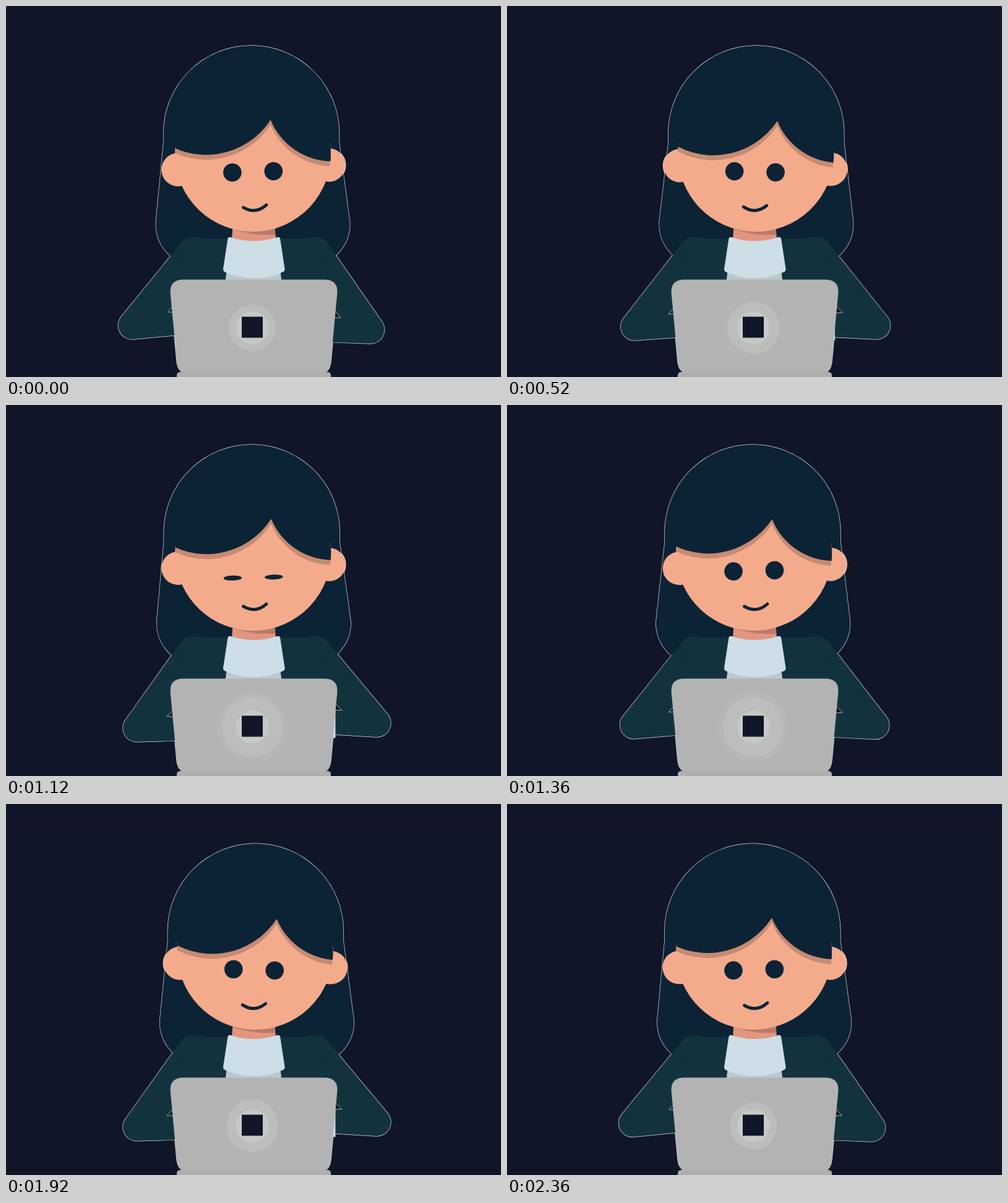
Animation of 800 by 600 pixels, one loop 2400 ms. Source, as an HTML page:

```html
<!DOCTYPE html>
<html lang="en">
<head>
<meta charset="utf-8">
<title>Working at a laptop</title>
<style>
  html, body { margin: 0; width: 100%; height: 100%; overflow: hidden; background: #101628; }
  svg { display: block; width: 100vw; height: 100vh; }
  .edge { fill: none; stroke: #fff; stroke-width: 1.4; stroke-opacity: .85; }
  .hair { fill: #0c2336; }
  .skin { fill: #f4ab8c; }
  .coat { fill: #12333d; }
  .shirt { fill: #cddee7; }
  .hole { fill: #101628; stroke: #fff; stroke-width: .8; stroke-opacity: .8; }
  .line { fill: none; stroke: #0c2336; }
</style>
</head>
<body>
<svg viewBox="0 0 800 600">
  <defs>
    <clipPath id="face"><circle cx="400.8" cy="239" r="126"/></clipPath>
  </defs>

  <!-- thin light rim, hidden wherever shapes overlap -->
  <g class="edge">
    <path class="armL"/>
    <path class="armR"/>
    <path class="lid"/>
    <g class="head">
      <g class="ears"><circle cx="279.3" cy="261" r="27"/><circle cx="523" cy="261" r="27"/></g>
    </g>
    <path class="mane"/>
  </g>

  <path class="hair mane"/>

  <path fill="#e2957f" d="M367 350H434L437 390H364Z"/>
  <path fill="#b97a69" d="M367 350H434L435 371Q396 371 367 361Z"/>

  <g class="head">
    <g class="skin ears"><circle cx="279.3" cy="261" r="27"/><circle cx="523" cy="261" r="27"/></g>
    <circle class="skin" cx="400.8" cy="239" r="126"/>
    <g clip-path="url(#face)">
      <path class="fringe" data-drop="8" fill="#c68b72"/>
      <path class="fringe hair" data-drop="0"/>
    </g>
    <!-- closes the seam between fringe and hair -->
    <path class="line" stroke-width="2.500" d="M275.600 224A126 126 0 0 1 526 224"/>
    <ellipse class="eye hair" cx="366.800" rx="14.800"/>
    <ellipse class="eye hair" cx="433.300" rx="14.800"/>
    <path class="line" stroke-width="5" stroke-linecap="round" d="M383 325.300Q402.500 337.500 420.300 322.300"/>
  </g>

  <path id="cuff" class="shirt"/>
  <path class="coat armL"/>
  <path class="coat armR"/>
  <path class="coat" d="M281 386Q288 374 302 374Q312 374 320 376.500H480Q490 374 500 374Q513 374 520 384L510 480H290Z"/>
  <path id="holeL" class="hole"/>
  <path id="holeR" class="hole"/>

  <path fill="#bac9ce" d="M357 425H443L446 450H354Z"/>
  <path fill="#e2957f" d="M367 370H434L436 382H365Z"/>
  <path class="shirt" d="M363 374Q400 386 438 374Q442.500 373 443.200 377L450.500 425Q451 429 447 430.500Q401 450 354.500 430.500Q350.500 429 351 425L358.300 377Q359 373 363 374Z"/>

  <rect x="276" y="592" width="249" height="14" rx="5" fill="#aeaeae"/>
  <path class="lid" fill="#b3b3b3"/>
  <circle id="halo" cx="398" cy="520.500" r="57" fill="#c4c8c4"/>
  <circle id="ring" cx="398" cy="520.500" fill="#bcbdbc"/>
  <circle cx="398" cy="520.500" r="26.500" fill="#c6cac7"/>
  <rect x="381" y="502.500" width="34" height="34" fill="#101628"/>
</svg>

<script>
const LOOP = 2400, STEP = 40;
const all = s => document.querySelectorAll(s);
const set = (s, name, value) => all(s).forEach(el => el.setAttribute(name, value));
const shape = (s, d) => set(s, 'd', d);
const mix = (a, b, k) => a + (b - a) * k;
// cosine wave from -1 to 1 that peaks at the given time
const wave = (t, period, peak) => Math.cos(2 * Math.PI * (t - peak) / period);
const unit = w => (1 + w) / 2;

function drawHair(sway, trail) {
  const x = 400 + 3.6 * sway, b = 401.6 + 3.9 * trail;
  shape('.mane', `M${x - 142} 222V206A142 142 0 0 1 ${x + 142} 206V222
    L${b + 156.8} 350C${b + 157.5} 372 ${b + 149} 392 ${b + 129} 408H${b - 129}
    C${b - 149} 392 ${b - 157.5} 372 ${b - 156.8} 350Z`);
}

function drawHead(t, sway) {
  set('.head', 'transform', `rotate(${1.78 * sway} 400 300)`);
  set('.ears', 'transform', `translate(${-0.8 * Math.sin(2 * Math.PI * t / LOOP)} 0)`);
  const tilt = 0.3 + 0.6 * wave(t, 1200, 350);
  all('.fringe').forEach(el => {
    // cancels the head's turn: the fringe slides and tilts by itself
    const x = 0.2 + 5.2 * sway, y = 0.8 * sway + +el.dataset.drop;
    el.setAttribute('transform',
      `rotate(${-1.78 * sway} 400 300) translate(${x} ${y}) rotate(${tilt} 405 200)`);
  });
  const away = Math.min(1, Math.abs(t - 1120) / 120);
  const ry = mix(4, 14.8, away * away * (3 - 2 * away));
  set('.eye', 'ry', ry);
  set('.eye', 'cy', 283 - ry);
}

function drawArms(l, r) {
  const R = 22.5;
  let x = mix(202.5, 211.5, l), y = mix(515.5, 522.3, l);
  shape('.armL', `M302 374Q288 374 281 386L${x - R * .79} ${y - R * .61}
    A${R} ${R} 0 0 0 ${x + 2} ${y + R}L300 ${mix(528, 542.5, l)}V386Z`);
  const hy = mix(493.5, 504, l), hx = mix(262, 260, l);
  shape('#holeL', `M${hx} ${hy}H276L274 ${hy - 14}Z`);

  x = mix(589, 600, r); y = mix(523.5, 514, r);
  shape('.armR', `M500 374Q513 374 520 384L${x + R * .8} ${y - R * .6}
    A${R} ${R} 0 0 1 ${x - 1} ${y + R}L${mix(522, 533, r)} ${mix(543.5, 532.5, r)}
    V${mix(500, 490, r)}L510 470V386Z`);
  const gx = mix(541, 543, r), gy = mix(504, 493, r);
  shape('#holeR', `M${gx} ${gy}H526L529 ${gy - 14}Z`);
  const end = mix(523, 533, r);
  shape('#cuff', `M490 ${gy + 5}H${end}V${mix(546, 538, r)}H490Z`);
}

function drawGlow(t) {
  const w = wave(t, LOOP, 1220);
  set('#ring', 'r', 43.5 + 5.5 * w);
  set('#halo', 'opacity', 0.14 * unit(w));
}

function draw(t) {
  const sway = wave(t, 1200, 650);
  drawHair(sway, wave(t, 1200, 760));
  drawHead(t, sway);
  drawArms(unit(wave(t, 800, 300)), unit(wave(t, 800, 380)));
  drawGlow(t);
}

shape('.fringe', `M250 100V213.900A124 124 0 0 0 432.400 185
  A107.800 107.800 0 0 0 532 251.600H560V100Z`);
shape('.lid', `M285 442.600H516Q537 443.600 535.300 465L525 575Q523 592 512 593
  H290Q278 592 276 575L265.700 465Q264 443.600 285 442.600Z`);

const start = performance.now();
function frame() {
  const t = (performance.now() - start) % LOOP;
  draw(Math.floor(t / STEP) * STEP);
  requestAnimationFrame(frame);
}
frame();
</script>
</body>
</html>
```
